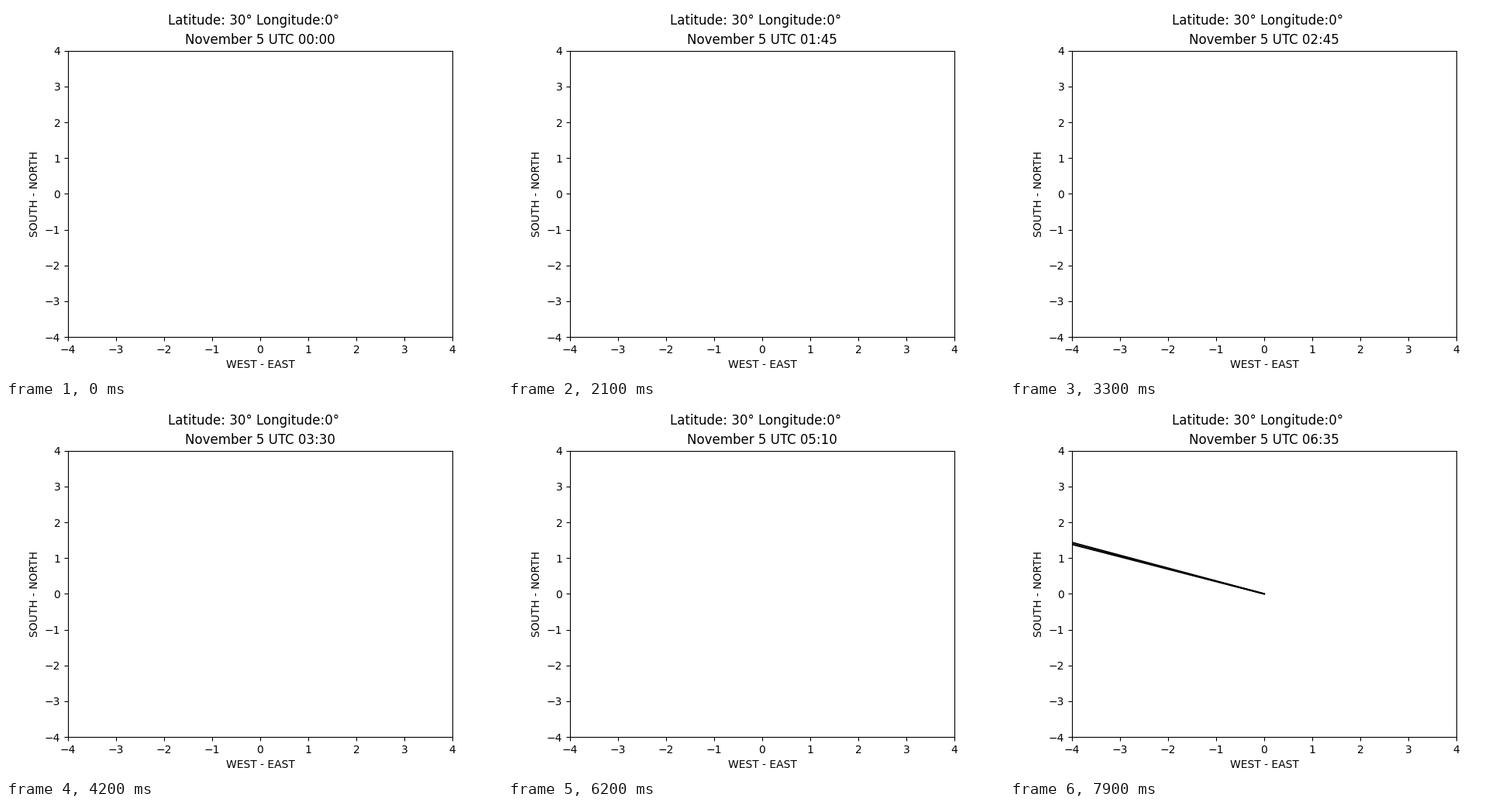
Animation, 640 px wide and 480 px high, one loop 8000 ms. Source, as a matplotlib script:

```python
import numpy as np
import matplotlib.pyplot as plt
from matplotlib.animation import FuncAnimation

FRAMES = 80
INTERVAL = 100          # ms
STEP = 5                # minutes of sky time per frame
LATITUDE = np.radians(30)
DECLINATION = np.radians(-15.8)
SOLAR_OFFSET = 13.6     # minutes the sun runs ahead of the clock
MIN_HEIGHT = 0.01       # sine of the lowest altitude that casts a shadow


def sun_direction(minutes):
    """East, north and up components of the unit vector to the sun."""
    hour_angle = np.radians((minutes + SOLAR_OFFSET) / 4 - 180)
    sin_lat, cos_lat = np.sin(LATITUDE), np.cos(LATITUDE)
    sin_dec, cos_dec = np.sin(DECLINATION), np.cos(DECLINATION)
    east = -cos_dec * np.sin(hour_angle)
    north = cos_lat * sin_dec - sin_lat * cos_dec * np.cos(hour_angle)
    up = sin_lat * sin_dec + cos_lat * cos_dec * np.cos(hour_angle)
    return east, north, up


fig, ax = plt.subplots(figsize=(6.4, 4.8), dpi=100)
fig.suptitle("Latitude: 30° Longitude:0°")
title = ax.set_title("")
ax.set_xlabel("WEST - EAST")
ax.set_ylabel("SOUTH - NORTH")

shadows = []
for i in range(FRAMES):
    east, north, up = sun_direction(i * STEP)
    if up > MIN_HEIGHT:
        line, = ax.plot([0, -east / up], [0, -north / up], color="black")
        shadows.append((i, line))

ax.set_xlim(-4, 4)
ax.set_ylim(-4, 4)


def update(i):
    hours, minutes = divmod(i * STEP, 60)
    title.set_text(f"November 5 UTC {hours:02d}:{minutes:02d}")
    for start, line in shadows:
        line.set_visible(i >= start)
    return [title] + [line for _, line in shadows]


anim = FuncAnimation(fig, update, frames=FRAMES, interval=INTERVAL,
                     repeat=True, repeat_delay=0, blit=False)
plt.show()
```
